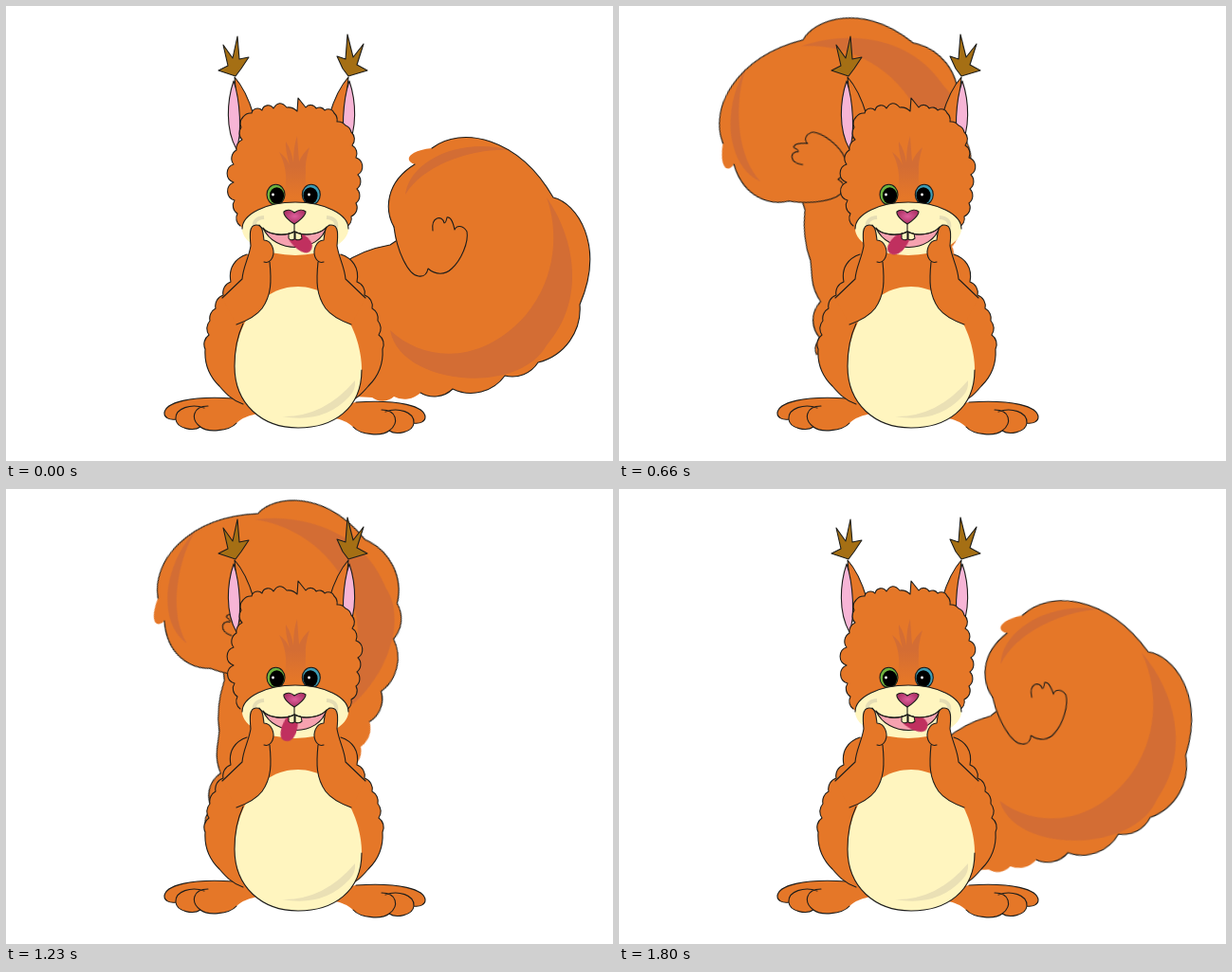
An HTML page that plays this animation: 640x480 px, repeating every 1830 ms.

```html
<!DOCTYPE html>
<html lang="en">
<head>
<meta charset="utf-8">
<title>Squirrel</title>
<style>
  html, body { margin: 0; height: 100%; overflow: hidden; background: #fff; }
  svg { display: block; width: 100vw; height: 100vh; }
  .fur { fill: #e57728; }
  .dark { fill: #d36d34; }
  .cream { fill: #fff5bf; }
  .pink { fill: #f7b5d6; }
  .tuft { fill: #a56f14; }
  .ink { stroke: #1d1d1b; stroke-width: 1.1; stroke-linejoin: round; stroke-linecap: round; }
  .line { fill: none; }
  /* One step per 30 ms: 29 steps out, 32 back. */
  #tail { transform-origin: 276px 371px; animation: wag 1830ms infinite; }
  #tongue { animation: lick 1830ms infinite; }
  @keyframes wag {
    0% { transform: rotate(0deg); animation-timing-function: steps(29); }
    47.541% { transform: rotate(-98.1deg); animation-timing-function: steps(32); }
    100% { transform: rotate(-2.95deg); }
  }
  @keyframes lick {
    0% { transform: translate(302px, 242px) rotate(38deg); animation-timing-function: steps(29); }
    47.541% { transform: translate(302px, 242px) rotate(160deg); animation-timing-function: steps(32); }
    100% { transform: translate(302px, 242px) rotate(18deg); }
  }
</style>
</head>
<body>
<svg viewBox="0 0 640 480">
  <defs>
    <linearGradient id="streak" x1="0" y1="0" x2="0" y2="1">
      <stop offset=".5" stop-color="#d36d34"/>
      <stop offset="1" stop-color="#d36d34" stop-opacity="0"/>
    </linearGradient>
    <radialGradient id="noseTone" cx=".5" cy=".45" r=".6">
      <stop offset="0" stop-color="#de5f9c"/>
      <stop offset="1" stop-color="#a52a5d"/>
    </radialGradient>
    <clipPath id="underLip">
      <path d="M260 226L271 234C277 242 295 243 304 238C313 243 330 242 338 233L348 226V285H260Z"/>
    </clipPath>
    <g id="foot">
      <path class="fur" d="M167 430C167 418 195 411 240 414L272 420V429C252 432 248 436 243 440C235 449 212 450 205 444C198 449 180 446 179 436C172 437 167 434 167 430Z"/>
      <path class="ink line" d="M240 414C195 411 167 418 167 430C167 434 172 437 179 436C180 446 198 449 205 444C212 450 235 449 243 440M179 436C178 424 196 419 209 424M205 444C194 436 197 422 213 422"/>
    </g>
    <g id="flank">
      <path class="fur" id="flankFill"/>
      <path class="ink line" id="flankLine"/>
    </g>
    <g id="arm">
      <path class="fur" d="M228 308L249 288C250 275 256 266 258 253C257 242 256 231 264 231C271 231 271 240 272 247C280 247 284 258 281 265C280 268 279 269 278 270C280 290 280 305 270 319C264 327 254 332 243 336Z"/>
      <path class="ink line" d="M228 308L249 288C250 275 256 266 258 253C257 242 256 231 264 231C271 231 271 240 272 247C280 247 284 258 281 265C279 270 275 271 272 270M278 270C280 290 280 305 270 319C264 327 254 332 243 336"/>
    </g>
    <g id="ear">
      <path class="fur ink" d="M241 75C249 84 256 98 261 115L247 140Z"/>
      <path class="pink ink" d="M240 79C233 100 231 130 243 151C249 135 247 100 240 79Z"/>
    </g>
  </defs>

  <g id="tail">
    <path class="fur" id="tailFill"/>
    <path class="dark" d="M570 202C600 245 612 310 570 358C540 412 415 400 405 342C440 375 500 380 548 326C582 285 582 235 570 202Z"/>
    <path class="dark" d="M421 199C426 162 480 138 532 152C490 150 440 168 421 199Z"/>
    <path class="ink line" id="tailLine"/>
    <path class="ink line" d="M409 233C412 258 424 284 435 285C441 286 444 282 445 277C453 284 463 284 470 277C480 268 488 249 486 238C482 231 475 231 473 236C471 226 468 222 465 223C464 228 463 229 462 229C460 220 448 222 450 237"/>
  </g>

  <use href="#foot"/>
  <use href="#foot" transform="matrix(-1 0 0 1 609 4)"/>
  <use href="#flank"/>
  <use href="#flank" transform="matrix(-1 0 0 1 607 0)"/>

  <path class="cream" d="M308 296C350 296 375 345 375 384C375 425 345 445 308 445C270 445 241 420 241 380C241 340 265 296 308 296Z"/>
  <path class="ink line" d="M250 335C244 348 241 365 241 380C241 420 270 445 308 445C345 445 375 425 375 384"/>
  <path fill="#eae0b5" d="M291 433Q335 434 368 395Q369 405 362 412Q335 441 291 433Z"/>

  <use href="#ear"/>
  <use href="#ear" transform="matrix(-1 0 0 1 602 0)"/>
  <path class="tuft ink" d="M242 74L224 68L234 63L229 41L239 55L244 32L246 56L256 54L248 66Z"/>
  <path class="tuft ink" d="M361 74L381 68L370 62L377 40L366 54L360 30L358 56L349 53L355 66Z"/>

  <path class="fur" id="headFill"/>
  <path class="ink line" id="headLine"/>
  <path fill="url(#streak)" d="M293 202C296 185 297 172 288 154Q296 160 299 168Q294 150 295 143Q301 152 303 165Q303 148 307 137Q308 152 309 164Q313 155 320 149Q315 165 316 175Q315 190 318 202Z"/>

  <g class="ink">
    <ellipse cx="284.5" cy="199" rx="9.5" ry="10.7" fill="#6db33f"/>
    <ellipse cx="321.8" cy="199" rx="9.5" ry="10.7" fill="#3e9db5"/>
  </g>
  <ellipse cx="285.5" cy="200" rx="7.6" ry="8.8"/>
  <ellipse cx="321" cy="200" rx="7.6" ry="8.8"/>
  <circle cx="281.5" cy="199" r="1.4" fill="#fff"/>
  <circle cx="319.5" cy="199" r="1.4" fill="#fff"/>

  <ellipse class="cream" cx="305" cy="235" rx="56" ry="28"/>
  <path class="ink line" d="M249 235A56 28 0 0 1 361 235"/>
  <path class="line" stroke="#e5ddb4" stroke-width="4" d="M262 234Q260 224 272 223M348 234Q350 224 338 223"/>

  <path class="ink" fill="#f6a2b0" d="M271 234C277 242 295 243 304 238C313 243 330 242 338 233C330 261 283 262 271 234Z"/>
  <g clip-path="url(#underLip)">
    <path id="tongue" fill="#c0305f" d="M0-6C8-9 25-10 25 1C25 10 8 9 0 6Z"/>
  </g>
  <path class="ink" fill="#fff5bf" d="M298 240Q301 240 304 238V246Q300 248 298 245ZM305 238Q308 240 311 240L312 245Q309 248 305 246Z"/>
  <path class="ink line" d="M267 231C275 243 295 243 304 238C313 243 332 242 341 231M304 229V238"/>
  <path class="ink" fill="url(#noseTone)" d="M304 230C299 227 292 221 293 217C296 214 301 215 304 218C308 215 313 214 316 217C316 221 309 227 304 230Z"/>

  <use href="#arm"/>
  <use href="#arm" transform="matrix(-1 0 0 1 607 0)"/>
</svg>
<script>
  // Fluffy edge: one outward arc from each point to the next.
  const lobes = (r, pts) => pts.split(', ').map(p => `A${r} ${r} 0 0 1 ${p}`).join('');
  const draw = (id, d) => document.getElementById(id).setAttribute('d', d);

  const stem = '261 305' + lobes(12, '278 305') + lobes(28, '316 294') +
    'C330 278 342 278 355 272C370 261 388 255 405 252L411 248';
  const curl = '409 233C399 215 400 186 431 167';
  const rim = '449 150C480 126 540 138 577 202C602 208 632 252 605 315' +
    lobes(58, '561 376') + lobes(32, '526 390') + lobes(44, '471 404') + lobes(28, '437 408');
  const root = lobes(24, '409 412') + lobes(18, '386 413') + 'L330 410L262 340Z';
  draw('tailFill', `M${stem}L${curl}C420 164 422 153 ${rim}${root}`);
  draw('tailLine', `M${stem}M${curl}M${rim}`);

  const flank = 'M250 420C238 416 231 408 225 401' +
    lobes(50, '210 362') + lobes(12, '214 347, 215 332, 221 319, 229 305, 237 291') +
    'C234 276 242 266 254 262';
  draw('flankLine', flank);
  draw('flankFill', flank + 'L304 255V425H262Z');

  const head = 'M247 232' +
    lobes(10, '244 219, 241 205, 240 186, 240 167, 243 152, 249 141, 248 128, 250 117, 259 113') +
    lobes(6.5, '270 110, 282 108') + 'Q288 98 296 107Q302 106 307 111L308 97L316 107' +
    lobes(6.5, '327 108, 336 110, 346 113') +
    lobes(10, '349 122, 358 126, 364 133, 365 147, 369 160, 371 178, 370 193, 369 208, 364 222, 359 233');
  draw('headLine', head);
  draw('headFill', head + 'L330 262H280Z');
</script>
</body>
</html>
```
